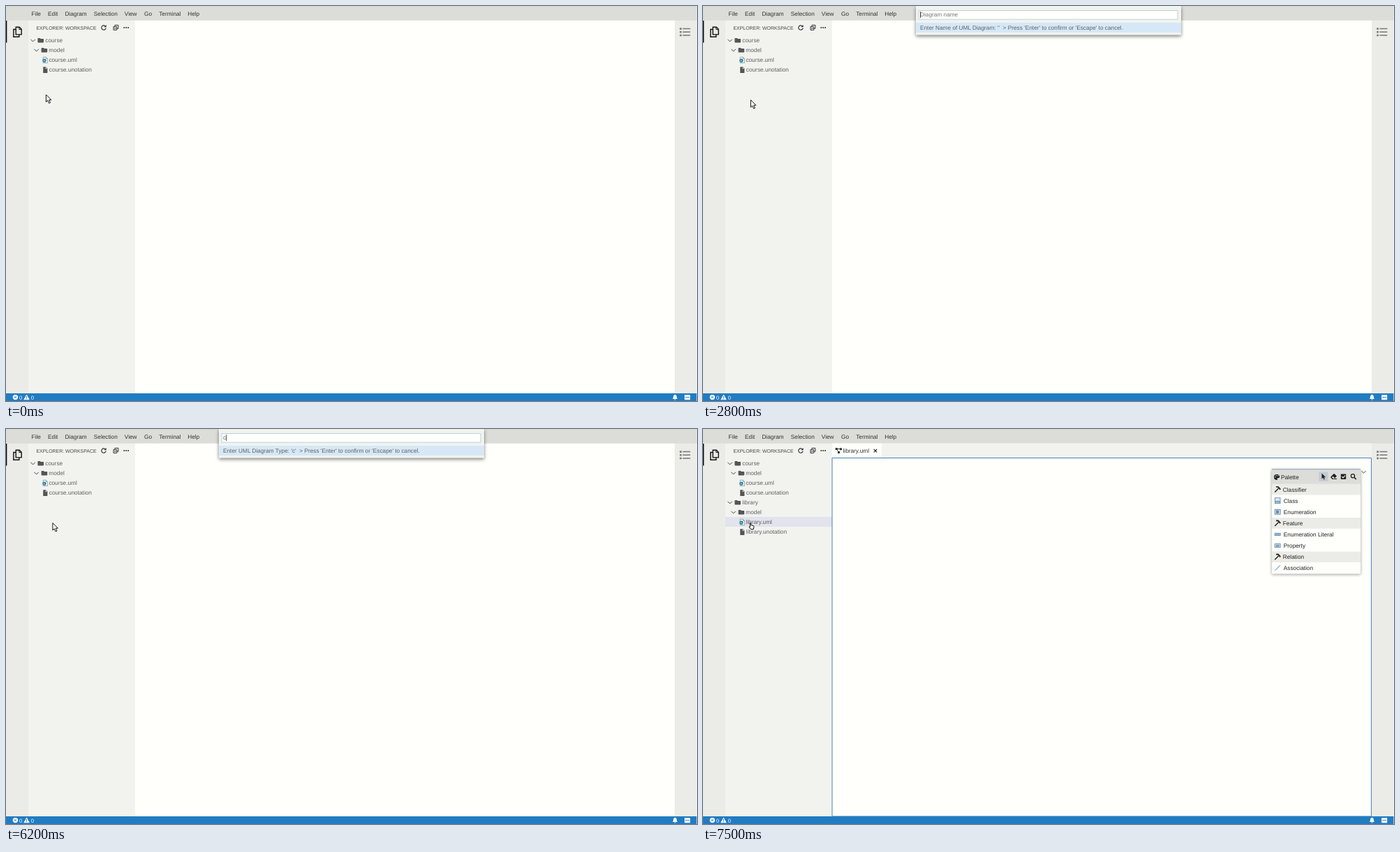
Recreate the animation shown at these times as an HTML page. Size 990 by 566 pixels, loop 8000 ms.

```html
<!DOCTYPE html>
<html lang="en">
<head>
<meta charset="utf-8">
<title>New UML diagram</title>
<style>
  html, body { margin: 0; width: 100%; height: 100%; overflow: hidden; background: #fffffc; }
  svg { display: block; width: 990px; height: 566px; }
  text {
    font: 8.27px "Liberation Sans", Arial, sans-serif;
    fill: #616161; white-space: pre; text-rendering: geometricPrecision;
  }
  .dark { fill: #333; }
  .line { fill: none; stroke: #333; }
  .shadow { filter: drop-shadow(0 1px 2px rgba(0, 0, 0, .4)); }
  #dialog { filter: drop-shadow(0 2px 2.5px rgba(0, 0, 0, .5)); }
  #status text { font-size: 7.64px; fill: #fff; }
</style>
</head>
<body>
<svg viewBox="0 0 990 566">
  <defs>
    <path id="chevron" fill="none" stroke="#444" d="M-3.2-1.6 0 1.6 3.2-1.6"/>
    <path id="folder" fill="#555" d="M-4.4-2.6q0-.8.8-.8h2.5l1 1h3.5q.8 0 .8.8v4q0 .8-.8.8h-7q-.8 0-.8-.8z"/>
    <path id="file" fill="#555" d="M-3-4.2h3.8L3.2-1.8v6q0 .3-.3.3h-5.6q-.3 0-.3-.3zM.4-3.6v2.2h2.2z" fill-rule="evenodd"/>
    <g id="model">
      <path d="M-2.6-4.2h4l2.4 2.3v6h-6.4z" fill="#fff" stroke="#75888a" stroke-width=".7"/>
      <path d="M1.4-4.2v2.3h2.4" fill="none" stroke="#75888a" stroke-width=".7"/>
      <circle cx="-.8" cy=".7" r="2.7" fill="#2786a5"/>
      <path d="M-2.3.7h2.5" stroke="#d8edf1" stroke-width=".8"/>
    </g>
    <g id="hammer" stroke="#222" fill="none">
      <path d="M-3.8 4 1.7-1.5" stroke-width="1.4"/>
      <path d="M-1.8-3.4Q1-4.4 2.4-2.2L4.2.2" stroke-width="1.9"/>
    </g>
  </defs>

  <path fill="#fffffc" d="M0 0h990v566H0z"/>
  <path fill="#f2f3ef" d="M32 20h153v535H32z"/>
  <path fill="#ebece8" d="M0 20h32v535H0zM958 20h31v535h-31z"/>
  <path fill="#dcddd9" d="M0 0h990v20.7H0z"/>
  <path fill="#d0d1cd" d="M0 0h990v.6H0z"/>
  <path d="M0 21h1.3v31.5H0z"/>
  <g id="menubar"></g>

  <!-- activity bars -->
  <g fill="none" stroke="#111" stroke-width="1.4">
    <path d="M14.2 30.3h5l3 3v7.6h-8z"/>
    <path d="M18.8 30.4v3.2h3.2" stroke-width="1"/>
    <path d="M14 33.5h-3.2v10.8h8v-3.2"/>
  </g>
  <path d="M969.4 32.6h11M969.4 37.3h11M969.4 42h11" stroke="#777" stroke-width="1.5"/>
  <path d="M965.3 32.6h2.6M965.3 37.3h2.6M965.3 42h2.6" stroke="#777" stroke-width="2.6"/>

  <!-- explorer -->
  <text x="43.4" y="33.5" style="font-size:6.95px;fill:#444">EXPLORER: WORKSPACE</text>
  <path class="line" stroke-width="1.2" d="M142.6 29.1A3.2 3.2 0 1 0 143.2 31.6"/>
  <path class="dark" d="M143.7 27v3.3h-3.3z"/>
  <path class="line" d="M154 29.6h4.8v4.8H154zM156 29.4v-2h4.9v4.9h-2M155 32h2.8"/>
  <path stroke="#333" stroke-width="2" stroke-linecap="round" d="M169.3 31h.01M172.2 31h.01M175.1 31h.01"/>
  <path id="selected" fill="#e2e3ed" d="M32 126h153v14H32z"/>
  <g id="course"></g>
  <g id="library"></g>

  <!-- diagram editor -->
  <g id="tab">
    <path fill="#f2f3ef" d="M185 20.7h773V42H185z"/>
    <path fill="#fffffc" d="M185 20.7h71V42h-71z"/>
    <path class="dark" d="M189.7 27h3v3h-3zM196 27.2h3v3h-3zM193 32h3v3h-3z"/>
    <path class="line" d="M192 28.6h5M191.5 29l3 4.5"/>
    <text x="200.5" y="34" class="dark">library.uml</text>
    <path class="line" stroke-width="1.2" d="m244.8 29 4.4 4.4m0-4.4-4.4 4.4"/>
  </g>
  <path id="frame" fill="#fffffc" stroke="#4c80b4" d="M185 41.5h772.5v513.5H185z"/>
  <g id="palette">
    <use href="#chevron" x="946.5" y="61.6"/>
    <path class="shadow" fill="#fffffc" d="M815 57.5h127V206q0 1.5-1.5 1.5h-124q-1.5 0-1.5-1.5z"/>
    <path fill="#dcddd9" d="M815 57.5h127V79H815z"/>
    <path fill="#8aa4bd" d="M815 57.2h127v1H815z"/>
    <path fill="#222" fill-rule="evenodd" d="M822 65a4 4 0 0 0 0 8q1.5 0 .8-1.5t1-1.3q2.4.3 2.4-1.4A4 4 0 0 0 822 65zM819.3 68.3h1.3v1.3h-1.3zM820.7 66h1.3v1.3h-1.3zM823.2 66.3h1.3v1.3h-1.3z"/>
    <text x="828" y="71.8" style="fill:#222">Palette</text>
    <path fill="#c5cad3" d="M882.5 61.5h13V75h-13z"/>
    <path fill="#222" d="M886.5 63.5v8l1.9-1.7 1.2 2.8 1.3-.6-1.2-2.7h2.5z"/>
    <path fill="#222" fill-rule="evenodd" d="m899 69 4.5-4.7q.6-.5 1.2 0l2.8 2.7q.5.6 0 1.2l-3 2.9h3.5v1h-6.5zM901 69.3l2 2h1l1-1-2.5-2.5z"/>
    <path fill="#222" d="M913.8 64.5h7.4V72h-7.4z"/>
    <path fill="none" stroke="#f2f3ef" stroke-width="1.2" d="m915.3 68.2 1.7 1.7 3-3.3"/>
    <circle cx="931" cy="67.3" r="2.6" fill="none" stroke="#222" stroke-width="1.3"/>
    <path stroke="#222" stroke-width="1.5" d="m933 69.3 2.8 2.8"/>
    <g id="tools"></g>
  </g>

  <!-- status bar -->
  <g id="status">
    <path fill="#217cc2" d="M0 555h990v11H0z"/>
    <circle cx="13.4" cy="560.6" r="3.7" fill="#fff"/>
    <path stroke="#217cc2" d="m11.9 559.1 3 3m0-3-3 3"/>
    <text x="19" y="563.5">0</text>
    <path fill="#fff" d="m29.5 556.5 4.3 7.7h-8.6z"/>
    <path stroke="#217cc2" d="M29.5 559v2.5m0 .7v1"/>
    <text x="35.7" y="563.5">0</text>
    <path fill="#fff" d="M954.7 563q1.5-1 1.5-3.5 0-2.5 2.3-2.8 2.3.3 2.3 2.8 0 2.5 1.5 3.5zM957.5 563.5h2q-.2 1.3-1 1.3t-1-1.3z"/>
    <path fill="#fff" d="M972.2 557.3h8v7h-8z"/>
    <path fill="#217cc2" d="M973.2 560.3h6v1h-6z"/>
  </g>
  <path fill="#f3f3f0" d="M989.4 0h.6v566h-.6z"/>

  <g id="context">
    <path class="shadow" fill="#fffffc" d="M57 127.5h187.2v220H57z"/>
    <path id="active" fill="#2179d8" d="M57 130h187.2v15.3H57z"/>
    <path fill="#e9f0c9" d="M63.3 133.8h5v7.8h-5z"/>
    <path fill="#6f9e58" d="M64.3 135h3v2.3h-3zM65.5 138.5h3v2.3h-3z"/>
    <g id="items"></g>
  </g>

  <g id="dialog">
    <path fill="#f2f3ef" d="M305 0h380v41.5H305z"/>
    <path fill="#fffffc" stroke="#a9c9da" stroke-width=".8" d="M309 6.5h371v12.7H309z"/>
    <path fill="#d6e8f7" d="M305 24h380v14H305z"/>
    <text id="input" x="311" y="15.3"></text>
    <text id="hint" x="311" y="33.7"></text>
    <path id="caret" fill="#222" d="M0 8h.8v9H0z"/>
  </g>

  <path id="arrow" d="M0 0v10.5l2.4-2.2 1.8 4 1.9-.8-1.8-3.9h3.2z"/>
  <path id="hand" fill="#fff" stroke="#111" d="M67.3 135.2q.2-1.4 1.5-.4v3l3.2.7q1.2.4 1 1.6l-.7 3.5h-4l-2-2.8q-.3-1 .7-.8l.5.4z"/>
</svg>
<script>
const $ = id => document.getElementById(id);
const label = (x, y, s, extra = '') => `<text x="${x}" y="${y}" ${extra}>${s}</text>`;
const icon = (id, x, y) => `<use href="#${id}" x="${x}" y="${y}"/>`;

const menuTitles = { File: 36.6, Edit: 60.1, Diagram: 84.4, Selection: 125.8, View: 169.8,
                     Go: 198, Terminal: 219.2, Help: 260.2 };
$('menubar').innerHTML = Object.entries(menuTitles)
  .map(([name, x]) => label(x, 13.6, name, 'class="dark"')).join('');

const project = (name, y) =>
  icon('chevron', 38.6, y + .4) + icon('folder', 49.8, y + .4) + label(56.3, y + 2.9, name) +
  icon('chevron', 43.6, y + 14.4) + icon('folder', 55, y + 14.4) + label(61.3, y + 16.9, 'model') +
  icon('model', 55.8, y + 28.4) + label(61.4, y + 30.9, name + '.uml') +
  icon('file', 56.2, y + 42.4) + label(61.8, y + 44.9, name + '.unotation');
$('course').innerHTML = project('course', 49);
$('library').innerHTML = project('library', 105);

// Context menu: an empty entry is a separator
let nextY = 130;
$('items').innerHTML = ['New UML Diagram', 'New File|Alt+N', 'New Folder', 'Open', 'Open in Terminal', '',
  'Select for Compare', '', 'Copy|Ctrl+C', 'Paste', 'Copy Path|Ctrl+Alt+C',
  'Copy Relative Path|Ctrl+Alt+Shift+C', 'Copy Download Link', '', 'Upload Files...', 'Download'
].map(entry => {
  const y = nextY;
  nextY += entry ? 15.27 : 5.6;
  if (!entry) return `<path fill="#bcbdb9" d="M57 ${y + 2.1}h187.2v1.4H57z"/>`;
  const [name, keys = ''] = entry.split('|');
  return label(75.2, y + 10.5, name) + label(231.4, y + 10.5, keys, 'text-anchor="end"');
}).join('');
const firstItem = $('items').querySelector('text');

const box = (x, y, w, h, fill) =>
  `<rect x="${x}" y="${y}" width="${w}" height="${h}" fill="${fill}" stroke="#5b7fa3" stroke-width=".8"/>`;
const stroke = (d, color = '#5b7fa3') => `<path stroke="${color}" stroke-width=".9" d="${d}"/>`;
const toolIcons = {
  Class: y => box(819.5, y - 4, 7.5, 8, '#dcebf7') + stroke(`M819.5 ${y + .8}h7.5m-7.5 1.6h7.5`),
  Enumeration: y => box(819.2, y - 3.4, 8, 6.8, '#c7dcec') + box(821.5, y - 1.8, 3, 3.5, '#6d92b5'),
  'Enumeration Literal': y => box(819.2, y - 1.7, 8, 3.4, '#b9d2e6') + stroke(`M820.5 ${y}h5.5`),
  Property: y => box(819.2, y - 2.5, 8, 5, '#dcebf7') + box(821.2, y - .8, 4, 1.8, '#9dbdd6'),
  Association: y => stroke(`M819.5 ${y + 3.5}l7.5-7.5`, '#41688e')
};
$('tools').innerHTML = ['Classifier', 'Class', 'Enumeration', 'Feature', 'Enumeration Literal',
  'Property', 'Relation', 'Association'].map((name, i) => {
  const y = 86.6 + i * 16.1, toolIcon = toolIcons[name];
  const lead = toolIcon ? toolIcon(y)
    : `<path fill="#ebece8" d="M815 ${y - 7.8}h127v15.6H815z"/>` + icon('hammer', 823, y);
  return lead + label(toolIcon ? 831.8 : 830.8, y + 2.9, name, 'style="fill:#222"');
}).join('');

const prompts = [
  { from: 2800, ask: 'Enter Name of UML Diagram', empty: 'Diagram name', caretOff: [3100, 3600],
    typed: [[3600, 'l'], [3800, 'li'], [3900, 'lib'], [4100, 'libr'], [4300, 'libra'], [4500, 'librar'], [4600, 'library']] },
  { from: 4800, ask: 'Enter UML Diagram Type', caretOff: [5200, 5800],
    empty: 'activity | class | component | deployment | package | sequence | statemachine | usecase',
    typed: [[6200, 'c'], [6400, 'cla'], [6600, 'clas'], [6700, 'class']] }
];
const show = (id, on) => { $(id).style.display = on ? '' : 'none'; };
const between = (t, a, b) => t >= a && t < b;

function drawDialog(t) {
  const { ask, empty, typed, caretOff } = prompts[t < prompts[1].from ? 0 : 1];
  const value = typed.filter(([at]) => at <= t).map(([, s]) => s).pop() || '';
  $('input').textContent = value || empty;
  $('input').style.fill = value ? '#616161' : '#777';
  $('hint').textContent = `${ask}: '${value}'  > Press 'Enter' to confirm or 'Escape' to cancel.`;
  const x = 311.2 + (value ? $('input').getComputedTextLength() : 0);
  $('caret').setAttribute('transform', `translate(${x})`);
  show('caret', !between(t, ...caretOff));
}

function drawPointer(t) {
  const p = Math.max(0, Math.min(3, Math.floor((t - 1300) / 100))) / 3;
  const x = 57.4 + 10 * p + (between(t, 2300, 3000) ? 1 : 0) - (t >= 3000 ? .5 : 0);
  const y = 127 + 6.6 * p + (t >= 2300 ? 1 : 0);
  const hovering = between(t, 1500, 2800);
  $('arrow').setAttribute('transform', `translate(${x} ${y})`);
  $('arrow').setAttribute('fill', hovering ? '#111' : '#fff');
  $('arrow').setAttribute('stroke', hovering ? '#fff' : '#111');
  show('active', hovering);
  firstItem.style.fill = hovering ? '#fff' : '';
}

function draw(t) {
  const dialogOpen = between(t, 2800, 7200);
  show('context', between(t, 1100, 2800));
  show('dialog', dialogOpen);
  show('library', t >= 7200);
  show('hand', t >= 7300);
  show('arrow', t < 7300);
  show('selected', t >= 7300);
  show('tab', t >= 7300);
  show('frame', t >= 7400);
  show('palette', t >= 7500);
  drawPointer(t);
  if (dialogOpen) drawDialog(t);
}

const startTime = performance.now();
(function tick() {
  draw((performance.now() - startTime) % 8000);
  requestAnimationFrame(tick);
})();
</script>
</body>
</html>
```
